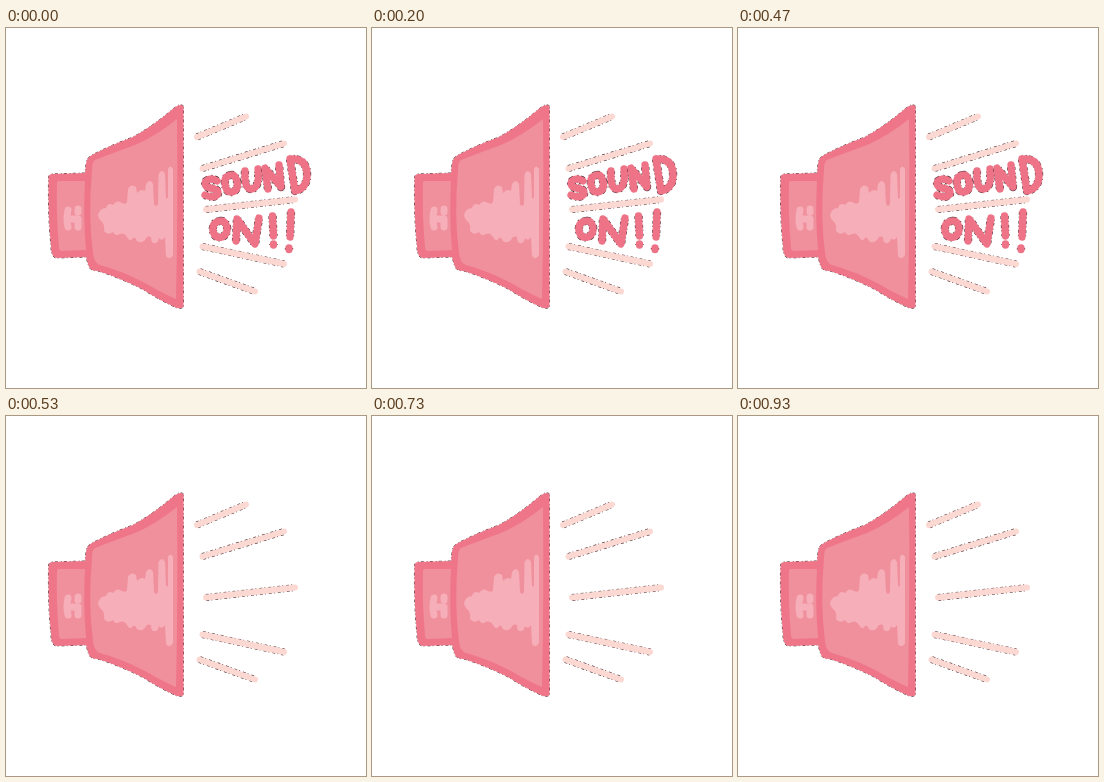
Recreate the animation shown at these times as an HTML page. Size 360 by 360 pixels, loop 1.07 s.

```html
<!DOCTYPE html>
<html lang="en">
<head>
<meta charset="utf-8">
<title>Sound on</title>
<style>
  html, body { margin: 0; width: 100%; height: 100%; overflow: hidden; background: #fff; }
  svg { display: block; width: 100vw; height: 100vh; }
  path { stroke-linejoin: round; }
  .ink { fill: none; stroke-linecap: round; }
  .fringe { fill: none; stroke: #4a3034; stroke-dasharray: 3 2 1 3; }
  .rim { fill: #ef7689; stroke: #4a3034; stroke-width: 1; stroke-dasharray: 3 2 1 3; paint-order: stroke; }
  .face { fill: #f0909c; }
  .shine { fill: #f6aeb9; }
  .dab { stroke: #f6aeb9; }
</style>
</head>
<body>
<svg viewBox="0 0 360 360" role="img" aria-label="Sound on!!">
  <g id="horn">
    <path class="rim" d="M177.500 78Q174 75 168 80Q147 98 127 109Q105 117 86 127Q80 130 80 137L79 145L46 146Q42 146 42.500 152Q42 190 45 218Q45 230 51 230L80 229L83 239Q85 243 92 243Q114 250 136 261Q155 273 171 280Q175 281 177.500 279Z"/>
    <path class="face" d="M52 153L79 153Q77 188 80 222L56 223Q53 223 53 219Q50 186 51 154Z"/>
    <path class="face" d="M171 91Q150 108 129 117Q107 125 89 132Q86 134 86 142Q82 188 87 225Q88 235 94 237Q116 243 139 255Q156 265 170 271Q172 180 171 91Z"/>
    <path class="shine" d="M92 187Q94 180 100 180Q102 174 107 177Q111 171 116 175Q120 177 121 174L122 161Q125 155 130 159L131 165Q135 160 139 163L140 156Q144 150 147 156L148 176Q150 180 152 176L152.500 146Q156 140 159 146L160 170Q161 172 162 169L162 141Q164 136 167 141L167 227Q164 233 160 228L159 209Q156 214 153 210Q152 216 148 215Q145 215 145 209Q141 207 139 212Q135 216 131 213Q129 208 127 210Q124 215 121 209Q118 204 114 206Q109 209 107 204Q102 208 98 203Q99 196 95 193Q92 190 92 187Z"/>
    <path class="ink dab" stroke-width="7" d="M62 182Q60 191 62 199M72 181V184M62 191H72V199"/>
  </g>
  <g id="rays"></g>
  <g id="words"></g>
</svg>
<script>
const rays = ["M191 109L240 88.500", "M196.500 140.500L278 115.500", "M200 181.500L289 171.500",
  "M196.500 218.500L278 236", "M193.500 243.500L249 263.500"];
const letters = [
  "M211 153Q205 149 200 153Q197 158 204 160Q213 161 212 166Q208 171 199 167", // S
  "M225 147Q218 148 219 156Q220 165 226 164Q233 162 231 153Q229 146 225 147Z", // O
  "M239 143Q238 162 246 161Q254 159 252 141", // U
  "M262 161L259 140L275 159L273 137", // N
  "M284 131L289 163Q302 160 301 145Q300 130 284 131", // D
  "M214 193Q206 194 207 203Q209 211 216 209Q222 206 221 199Q219 192 214 193Z", // O
  "M230 213L231 191L249 216L253 190", // N
  "M266.500 188L267.500 208M267.500 216V217", // !
  "M285 184L284 209M283 220V221.500" // !
];

// A soft round stroke over a broken dark edge
const brush = (d, color, width) =>
  `<path class="fringe" stroke-width="${width + 1}" d="${d}"/>
   <path class="ink" stroke="${color}" stroke-width="${width}" d="${d}"/>`;
const fill = (id, list, color, width) =>
  document.getElementById(id).innerHTML = list.map(d => brush(d, color, width)).join("");

fill("rays", rays, "#fcd8d2", 6);
fill("words", letters, "#ee7387", 7.3);

const LOOP = 1070, WORDS_OFF = 530;
const words = document.getElementById("words");
function draw(now) {
  words.style.visibility = now % LOOP < WORDS_OFF ? "visible" : "hidden";
  requestAnimationFrame(draw);
}
draw(performance.now());
</script>
</body>
</html>
```
